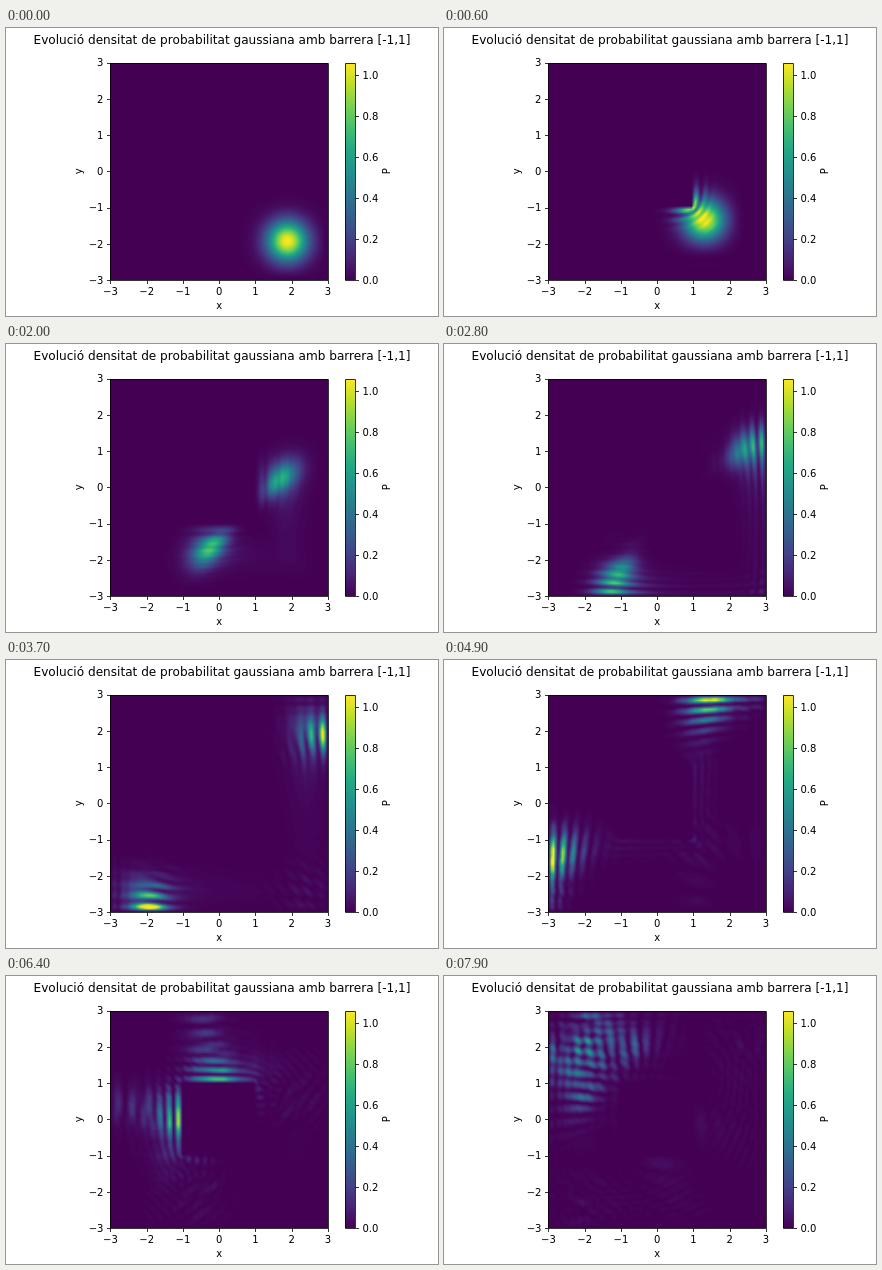
An HTML page with a canvas that plays this animation: 432 by 288 pixels, repeating every 8000 ms.

```html
<!DOCTYPE html>
<html lang="ca">
<head>
<meta charset="utf-8">
<title>Densitat de probabilitat</title>
<style>
  html, body { margin: 0; width: 100%; height: 100%; overflow: hidden; background: #fff; }
  canvas, svg { position: absolute; left: 0; top: 0; width: 432px; height: 288px; }
  text { font: 10px "DejaVu Sans", sans-serif; fill: #000; }
  .title { font-size: 12.1px; }
  path { fill: none; stroke: #000; stroke-width: .8; }
</style>
</head>
<body>
<canvas id="stage" width="432" height="288"></canvas>
<svg id="axes" viewBox="0 0 432 288" xmlns="http://www.w3.org/2000/svg"></svg>
<script>
const FRAMES = 80, FRAME_MS = 100;
const BOX = { left: 104.4, right: 321.84, top: 34.56, bottom: 252 };
const BAR = { left: 338.58, right: 349.45 };
const PEAK = 1 / (0.3 * Math.PI);

// Viridis, interpolated between a few stops
const STOPS = ['440154', '482475', '414487', '355f8d', '2a788e', '21918c',
  '22a884', '44bf70', '7ad151', 'bddf26', 'fde725'];
const rgb = STOPS.map(s => [0, 2, 4].map(i => parseInt(s.substr(i, 2), 16)));
const palette = Array.from({ length: 256 }, (_, i) => {
  const p = i / 255 * (rgb.length - 1);
  const a = Math.min(Math.floor(p), rgb.length - 2);
  return rgb[a].map((c, ch) => Math.round(c + (rgb[a + 1][ch] - c) * (p - a)));
});

// Schrödinger equation on a walled square with a solid barrier,
// advanced by one alternating-direction Crank-Nicolson step per frame
const N = 121, H = 6 / (N - 1), DT = 0.01, R = DT / (4 * H * H);
const K = 11.7, START = { x: 1.98, y: -2.02 };
const grid = () => new Float64Array(N * N);
let re = grid(), im = grid(), nextRe = grid(), nextIm = grid();
const open = new Uint8Array(N * N), depth = new Uint8Array(N * N);

function inBarrier(x, y) {
  const e = H / 2;
  return x > -1 - e && x < 1 - e && y > -1 + e && y < 1 + e;
}

for (let j = 1; j < N - 1; j++) {
  for (let i = 1; i < N - 1; i++) {
    const x = -3 + i * H, y = 3 - j * H;
    if (inBarrier(x, y)) continue;
    const n = j * N + i, dx = x - START.x, dy = y - START.y;
    const amp = Math.sqrt(PEAK) * Math.exp(-(dx * dx + dy * dy) / 0.6);
    open[n] = 1;
    re[n] = amp * Math.cos(K * (dy - dx));
    im[n] = amp * Math.sin(K * (dy - dx));
  }
}

// Inverse pivots of the tridiagonal solve, by distance from the nearest wall
const pivRe = new Float64Array(N), pivIm = new Float64Array(N);
for (let m = 0; m < N; m++) {
  const a = 1 + (m ? R * R * pivRe[m - 1] : 0);
  const b = 2 * R + (m ? R * R * pivIm[m - 1] : 0);
  const d = a * a + b * b;
  pivRe[m] = a / d;
  pivIm[m] = -b / d;
}

function explicitHalf(s) {
  for (let n = 0; n < N * N; n++) {
    if (!open[n]) continue;
    nextRe[n] = re[n] + R * (2 * im[n] - im[n - s] - im[n + s]);
    nextIm[n] = im[n] - R * (2 * re[n] - re[n - s] - re[n + s]);
  }
}

function implicitHalf(s, cross) {
  const qr = nextRe, qi = nextIm;
  for (let line = 1; line < N - 1; line++) {
    let m = 0;
    for (let k = 1; k < N - 1; k++) {
      const n = line * cross + k * s;
      if (!open[n]) { m = 0; continue; }
      const a = qr[n] - R * qi[n - s], b = qi[n] + R * qr[n - s];
      qr[n] = a * pivRe[m] - b * pivIm[m];
      qi[n] = a * pivIm[m] + b * pivRe[m];
      depth[n] = m++;
    }
    for (let k = N - 2; k > 0; k--) {
      const n = line * cross + k * s;
      if (!open[n]) continue;
      const g = pivRe[depth[n]], h = pivIm[depth[n]];
      const xr = qr[n + s], xi = qi[n + s];
      qr[n] -= R * (g * xi + h * xr);
      qi[n] += R * (g * xr - h * xi);
    }
  }
  [re, nextRe, im, nextIm] = [nextRe, re, nextIm, im];
}

const density = [];
function advance() {
  explicitHalf(N);
  implicitHalf(1, N);
  explicitHalf(1);
  implicitHalf(N, 1);
  const shade = new Uint8ClampedArray(N * N);
  for (let n = 0; n < N * N; n++) shade[n] = (re[n] * re[n] + im[n] * im[n]) / PEAK * 255;
  density.push(shade);
}

// Drawing
const ctx = document.getElementById('stage').getContext('2d');
const field = document.createElement('canvas');
field.width = field.height = N;
const fieldCtx = field.getContext('2d');
const pixels = fieldCtx.createImageData(N, N);
const snap = v => Math.floor(v + 0.5) + 0.5;

function drawFrame(f) {
  while (density.length <= f) advance();
  density[f].forEach((v, n) => {
    const [r, g, b] = palette[v];
    pixels.data.set([r, g, b, 255], n * 4);
  });
  fieldCtx.putImageData(pixels, 0, 0);
  ctx.drawImage(field, 0.5, 0.5, N - 1, N - 1, 104, 35, 218, 217);
}

function drawBar() {
  const grad = ctx.createLinearGradient(0, BOX.bottom, 0, BOX.top);
  STOPS.forEach((s, i) => grad.addColorStop(i / (STOPS.length - 1), '#' + s));
  ctx.fillStyle = grad;
  ctx.fillRect(339, 35, 10, 217);
}

function buildAxes() {
  const out = [];
  const line = d => out.push(`<path d="${d}"/>`);
  const text = (s, x, y, anchor = 'middle', extra = '') =>
    out.push(`<text x="${x}" y="${y}" text-anchor="${anchor}" ${extra}>${s}</text>`);
  const turned = (s, x, y) => text(s, 0, 0, 'middle', `transform="translate(${x} ${y}) rotate(-90)"`);
  const frame = b => line(`M${snap(b.left)} ${snap(BOX.top)}H${snap(b.right)}V${snap(BOX.bottom)}H${snap(b.left)}Z`);

  const unit = (BOX.bottom - BOX.top) / 6;
  for (let v = -3; v <= 3; v++) {
    const x = BOX.left + (v + 3) * unit, y = BOX.bottom - (v + 3) * unit;
    const label = v < 0 ? '\u2212' + -v : v;
    line(`M${snap(x)} 252.5v3.5M104.5 ${snap(y)}h-3.5`);
    text(label, x, 266.6);
    text(label, 97.4, y + 3.8, 'end');
  }
  for (let v = 0; v <= 5; v++) {
    const y = BOX.bottom - v * 0.2 / PEAK * (BOX.bottom - BOX.top);
    line(`M349.5 ${snap(y)}h3.5`);
    text((v * 0.2).toFixed(1), 356.4, y + 3.8, 'start');
  }
  frame(BOX);
  frame(BAR);
  text('x', 213.1, 281);
  turned('y', 75.8, 143.3);
  turned('P', 384, 143.3);
  text('Evolució densitat de probabilitat gaussiana amb barrera [-1,1]', 216, 16, 'middle', 'class="title"');
  document.getElementById('axes').innerHTML = out.join('');
}

let shown = -1;
const start = performance.now();
function tick() {
  const f = Math.floor(Math.max(0, performance.now() - start) / FRAME_MS) % FRAMES;
  if (f !== shown) drawFrame(shown = f);
  requestAnimationFrame(tick);
}
buildAxes();
drawBar();
tick();
</script>
</body>
</html>
```
